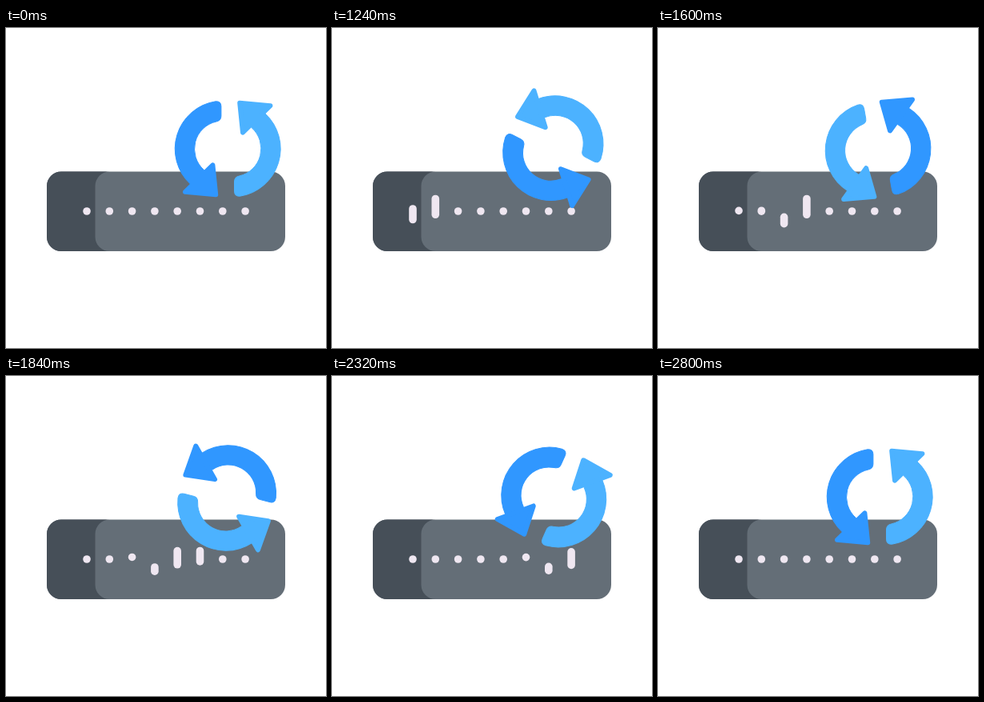
Animation of 400x400 px, one loop 2.83 s. Source, as an HTML page:

```html
<!DOCTYPE html>
<html lang="en">
<head>
<meta charset="utf-8">
<title>Router sync</title>
<style>
  html, body { margin: 0; width: 100%; height: 100%; overflow: hidden; background: #fff; }
  svg { display: block; width: 100vw; height: 100vh; }
</style>
</head>
<body>
<svg viewBox="0 0 400 400" xmlns="http://www.w3.org/2000/svg">
  <defs>
    <g id="arrow">
      <path d="M324 107A60 60 0 0 1 292.5 210.2Q285.5 210.8 285.5 204V192Q285.5 186.2 291.5 185A35 35 0 0 0 307 124.6L303 104Z"/>
      <path d="M292.2 93.7L330.4 97.2L296 130.6Z" stroke-width="6" stroke-linejoin="round"/>
    </g>
  </defs>
  <rect x="51" y="179.5" width="298" height="99.5" rx="18" fill="#646e77"/>
  <path d="M129.5 179.5H69a18 18 0 0 0-18 18V261a18 18 0 0 0 18 18H129.5a18 18 0 0 1-18-18V197.5a18 18 0 0 1 18-18Z" fill="#464f58"/>
  <g id="bars" fill="#efe7f1"></g>
  <g id="arrows">
    <use href="#arrow" fill="#4cb2ff" stroke="#4cb2ff"/>
    <use href="#arrow" fill="#3097ff" stroke="#3097ff" transform="rotate(180 277.2 151)"/>
  </g>
</svg>
<script>
  const LOOP = 2830, HOLD = 1030, STEP = 30;
  const SPIN_START = 1000, SPIN_END = 2800;
  const BAR_START = 1010, BAR_DELAY = 158;
  const BAR_COUNT = 8, BAR_GAP = 28.3, RADIUS = 4.8, REST_Y = 229;

  // How far each end of a bar is from rest at the turning points of its bounce
  const POSES = [
    { at: 0, top: 0, bottom: 0 },
    { at: 65, top: -15.5, bottom: 4.3 },
    { at: 150, top: -15.5, bottom: 4.3 },
    { at: 320, top: 12, bottom: 18 },
    { at: 470, top: -3, bottom: -3 },
    { at: 640, top: 0, bottom: 0 }
  ];

  const svgNS = "http://www.w3.org/2000/svg";
  const arrows = document.getElementById("arrows");
  const bars = Array.from({ length: BAR_COUNT }, (_, i) => {
    const bar = document.createElementNS(svgNS, "rect");
    bar.setAttribute("x", 101 + BAR_GAP * i - RADIUS);
    bar.setAttribute("width", 2 * RADIUS);
    bar.setAttribute("rx", RADIUS);
    return document.getElementById("bars").appendChild(bar);
  });

  const clamp = v => Math.min(1, Math.max(0, v));
  const lerp = (a, b, k) => a + (b - a) * k;
  const sineEase = k => (1 - Math.cos(Math.PI * k)) / 2;

  // cubic-bezier(x1, 0, x2, 1)
  function bezierEase(x, x1, x2) {
    let lo = 0, hi = 1;
    for (let i = 0; i < 24; i++) {
      const s = (lo + hi) / 2, r = 1 - s;
      if (3 * x1 * s * r * r + 3 * x2 * s * s * r + s ** 3 < x) lo = s;
      else hi = s;
    }
    return lo * lo * (3 - 2 * lo);
  }

  function barPose(age) {
    const next = POSES.findIndex(pose => pose.at > age);
    if (next < 1) return POSES[0];
    const a = POSES[next - 1], b = POSES[next];
    const k = sineEase((age - a.at) / (b.at - a.at));
    return { top: lerp(a.top, b.top, k), bottom: lerp(a.bottom, b.bottom, k) };
  }

  function render(time) {
    const t = time < HOLD ? 0 : HOLD + Math.floor((time - HOLD) / STEP) * STEP;
    const progress = clamp((t - SPIN_START) / (SPIN_END - SPIN_START));
    const turn = 360 * bezierEase(progress, 0.128, 0.38);
    arrows.setAttribute("transform", `rotate(${-turn} 276.1 151.3)`);
    bars.forEach((bar, i) => {
      const { top, bottom } = barPose(t - BAR_START - i * BAR_DELAY);
      bar.setAttribute("y", REST_Y - RADIUS + top);
      bar.setAttribute("height", 2 * RADIUS + bottom - top);
    });
  }

  const start = performance.now();
  function tick() {
    // a 1 ms lead absorbs clock rounding at the step edges
    render((performance.now() - start + 1) % LOOP);
    requestAnimationFrame(tick);
  }
  tick();
</script>
</body>
</html>
```
